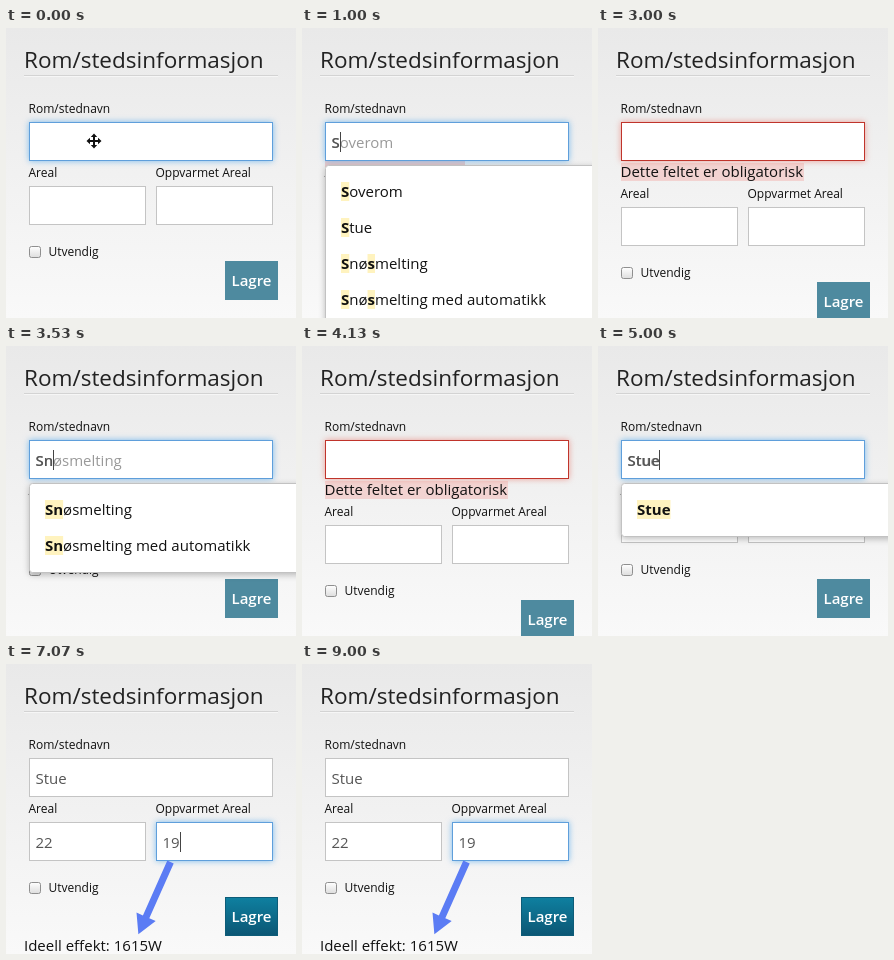
Animation, 290 px wide and 290 px high, one loop 9.2 s. Source, as an HTML page:

```html
<!DOCTYPE html>
<html lang="no">
<head>
<meta charset="utf-8">
<style>
  html, body { margin: 0; width: 100%; height: 100%; overflow: hidden; background: #f2f2f2; }
  svg { display: block; width: 290px; height: 290px; font-family: "Open Sans", "Noto Sans", sans-serif; }
  text { white-space: pre; }
</style>
</head>
<body>
<svg id="stage" viewBox="0 0 290 290"></svg>
<script>
const LOOP = 9200;
const SHIFT = 21;
const ROOMS = ['Soverom', 'Stue', 'Snøsmelting', 'Snøsmelting med automatikk',
  'Badegulv', 'Bad', 'Baderom', 'Bod'];
const stage = document.getElementById('stage');
const pen = document.createElement('canvas').getContext('2d');

const start = { name: '', area: '', heat: '', focus: 'name', caret: false, open: false,
  error: false, strip: false, pointer: true, dot: null, power: '', bright: false };

// Each step patches the state that came before it.
const steps = [
  [70, { pointer: false, name: 'S', open: true, caret: true }],
  [270, { name: 'So' }],
  [670, { caret: false }],
  [1000, { name: 'S', caret: true, strip: true }],
  [1070, { name: '', open: false, strip: false }],
  [1130, { error: true }],
  [1330, { caret: false }],
  [1600, { name: 'B', open: true, error: false, caret: true }],
  [1730, { name: 'Ba' }],
  [1870, { name: 'Bad' }],
  [2270, { caret: false }],
  [2530, { name: 'Ba', caret: true }],
  [2670, { name: 'B' }],
  [2800, { name: '', open: false }],
  [2870, { error: true }],
  [3000, { caret: false }],
  [3270, { name: 'S', open: true, error: false, caret: true }],
  [3470, { name: 'Sn' }],
  [3870, { name: 'S' }],
  [4000, { name: '', open: false }],
  [4070, { error: true }],
  [4130, { caret: false }],
  [4330, { caret: true }],
  [4470, { name: 'S', open: true, error: false }],
  [4670, { name: 'St' }],
  [4870, { name: 'Stu' }],
  [5000, { name: 'Stue' }],
  [5130, { dot: [91, 159] }],
  [5270, { open: false, caret: false }],
  [5470, { dot: [77, 175], focus: '' }],
  [5670, { focus: 'area', caret: true }],
  [5870, { caret: false }],
  [6070, { caret: true }],
  [6130, { area: '2', dot: null }],
  [6200, { area: '22' }],
  [6270, { focus: 'heat' }],
  [6530, { heat: '1', power: '85W' }],
  [6670, { heat: '19', power: '1615W', bright: true }],
  [7330, { caret: false }],
  [7800, { caret: true }],
  [8200, { caret: false }],
  [8600, { caret: true }],
  [9000, { caret: false }]
];

function stateAt(t) {
  const state = { ...start };
  for (const [time, patch] of steps) if (t >= time) Object.assign(state, patch);
  return state;
}

function widthOf(str, size, weight = 400) {
  pen.font = `${weight} ${size}px "Open Sans", "Noto Sans", sans-serif`;
  return pen.measureText(str).width;
}

const rect = (x, y, w, h, fill, extra = '') =>
  `<rect x="${x}" y="${y}" width="${w}" height="${h}" fill="${fill}" ${extra}/>`;

const text = (x, y, size, str, fill = '#111', weight = 400) =>
  `<text x="${x}" y="${y}" font-size="${size}" fill="${fill}" font-weight="${weight}">${str}</text>`;

function field(x, y, w, value, focused, caret, error, hint = '') {
  const border = error ? '#c0342b' : focused ? '#5f9fdb' : '#c4c4c4';
  const glow = error ? 'rgba(235,130,120,.75)' : 'rgba(82,168,236,.75)';
  const style = error || focused ? `style="filter:drop-shadow(0 0 3px ${glow})"` : '';
  let out = rect(x + .5, y + .5, w - 1, 38, '#fff', `stroke="${border}" ${style}`);
  if (hint) out += text(x + 6.5, y + 26, 15, hint, '#999');
  if (value) out += text(x + 6.5, y + 26, 15, value, '#555', hint ? 600 : 400);
  if (focused && caret) {
    out += rect(Math.round(x + 7 + widthOf(value, 15)), y + 10, 1, 20, '#444');
  }
  return out;
}

function row(name, query, y) {
  const parts = name.split(new RegExp(`(${query})`, 'i'));
  let x = 39, out = '';
  parts.forEach((part, i) => {
    const hit = i % 2;
    const weight = hit ? 700 : 400;
    const w = widthOf(part, 15, weight);
    if (hit) out += rect(x, y - 15, w, 19, '#fff3bf');
    out += text(x, y, 15, part, '#111', weight);
    x += w;
  });
  return out;
}

function menu(matches, query) {
  const h = matches.length * 36 + 17;
  return rect(23.5, 137.5, 300, h, '#fff',
    'rx="3" stroke="#c2c2c2" style="filter:drop-shadow(0 2px 3px rgba(0,0,0,.25))"') +
    matches.map((name, i) => row(name, query, 169 + i * 36)).join('');
}

function arrow(p) {
  return `<g transform="translate(164.5 198) rotate(114)" fill="#5b7cf4">
    <path d="M0-3.5H${60 * p}V-10.5L${79 * p} 0L${60 * p} 10.5V3.5H0Z"/></g>`;
}

const pointer = `<g transform="translate(88 113)"><path id="cross" stroke="#fff" stroke-width="1.5"
  paint-order="stroke" fill="#111" d="M0-7.5L3.2-4H1V-1H4V-3.2L7.5 0L4 3.2V1H1V4H3.2L0 7.5L-3.2 4H-1V1H-4V3.2L-7.5 0L-4-3.2V-1H-1V-4H-3.2Z"/></g>`;

const defs = `<defs>
  <linearGradient id="page" x2="0" y2="1"><stop stop-color="#e9e9e9"/><stop offset="1" stop-color="#f9f9f9"/></linearGradient>
  <linearGradient id="save" x2="0" y2="1"><stop stop-color="#0f80a0"/><stop offset="1" stop-color="#0b5674"/></linearGradient>
  <linearGradient id="box" x2="0" y2="1"><stop stop-color="#fff"/><stop offset="1" stop-color="#ddd"/></linearGradient>
</defs>`;

function form(s) {
  const button = s.bright
    ? rect(219.5, 233.5, 52, 38, 'url(#save)', 'stroke="#0d5c78"')
    : rect(219, 233, 53, 39, '#4e8a9f');
  return text(22.5, 149, 12, 'Areal') + text(149.5, 149, 12, 'Oppvarmet Areal') +
    field(23, 158, 117, s.area, s.focus === 'area', s.caret) +
    field(150, 158, 117, s.heat, s.focus === 'heat', s.caret) +
    rect(23.5, 218.5, 11, 11, 'url(#box)', 'rx="2" stroke="#8f8f8f"') +
    text(42.5, 228, 12, 'Utvendig') +
    button + text(225.5, 258, 15, 'Lagre', '#fff', 600);
}

function render(t) {
  const s = stateAt(t);
  const matches = s.open ? ROOMS.filter(name => name.startsWith(s.name)) : [];
  let out = defs + rect(0, 0, 290, 290, 'url(#page)') +
    text(18, 40, 22.5, 'Rom/stedsinformasjon', '#222') +
    rect(18, 47, 254, 1, '#d3d3d3') + rect(18, 48, 254, 1, '#f6f6f6') +
    text(22.5, 85, 12, 'Rom/stednavn');
  if (s.error) out += rect(23, 135, 183, 18, '#f2d3d1') + text(22.5, 149, 15, 'Dette feltet er obligatorisk');
  out += `<g transform="translate(0 ${s.error ? SHIFT : 0})">${form(s)}</g>`;
  if (s.strip) out += rect(23, 133, 140, 6, '#eccaca');
  out += field(23, 94, 244, s.name, s.focus === 'name', s.caret, s.error, matches[0]);
  if (s.open) out += menu(matches, s.name);
  if (s.power) out += text(18, 287, 15, 'Ideell effekt: ' + s.power);
  if (t >= 6800) out += arrow(Math.min(1, (t - 6730) / 340));
  if (s.pointer) out += pointer;
  if (s.dot) out += `<circle cx="${s.dot[0]}" cy="${s.dot[1]}" r="9" fill="#8d8d8d" stroke="#7c7c7c"/>`;
  return out;
}

const begin = performance.now();
let last = '';
function tick() {
  const now = render((performance.now() - begin) % LOOP);
  if (now !== last) stage.innerHTML = last = now;
  requestAnimationFrame(tick);
}
tick();
</script>
</body>
</html>
```
